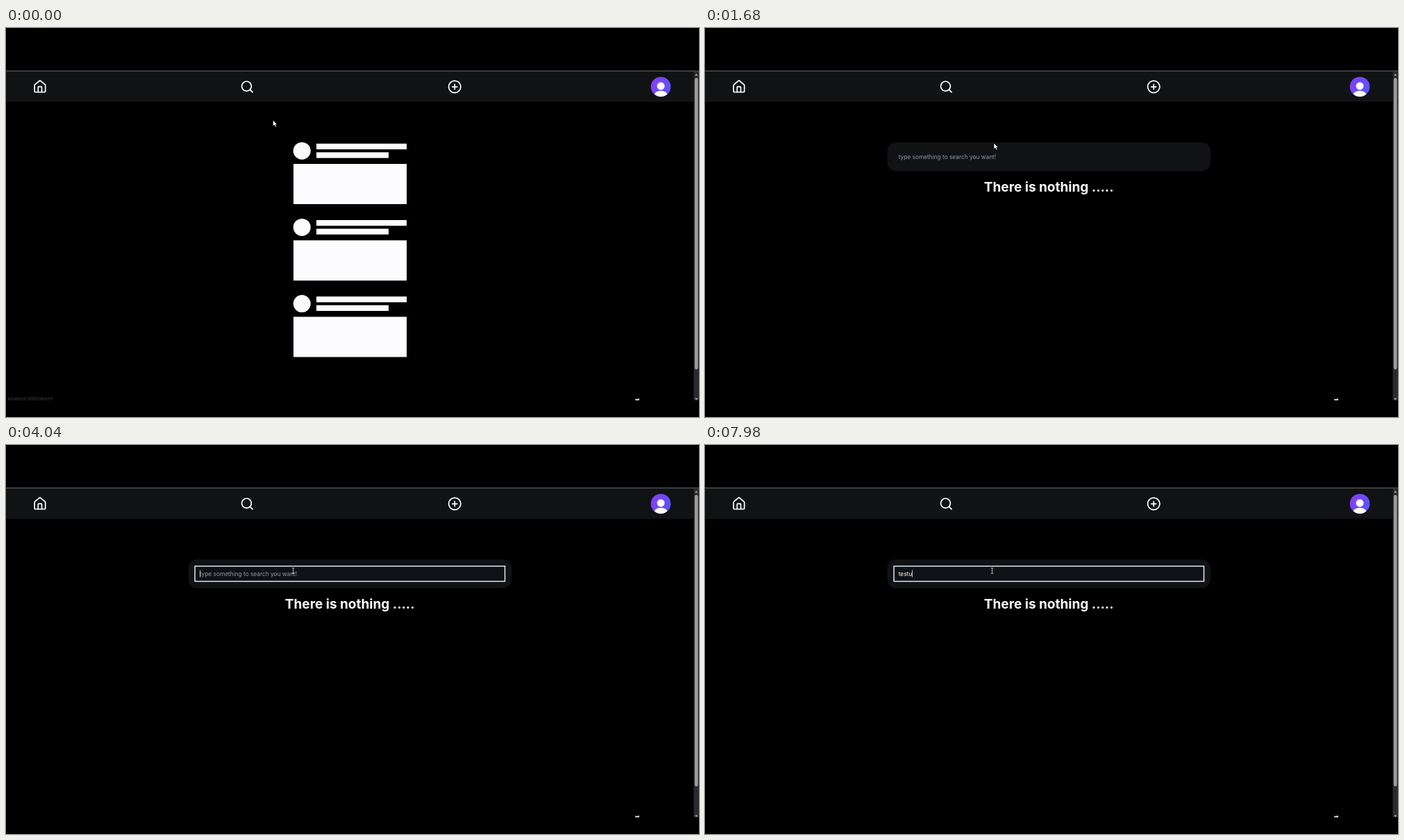
An HTML page that plays this animation: 998 by 561 pixels, repeating every 8 s.

```html
<!DOCTYPE html>
<html lang="en">
<head>
<meta charset="utf-8">
<title>Search page</title>
<style>
  html, body { margin: 0; width: 100%; height: 100%; overflow: hidden; background: #000; }
  svg { display: block; width: 100vw; height: 100vh; font-family: Inter, sans-serif; }
  .icon { fill: none; stroke: #fff; stroke-width: 2; stroke-linecap: round; stroke-linejoin: round; }
</style>
</head>
<body>
<svg viewBox="0 0 998 561">
  <defs>
    <linearGradient id="violet" x1="0" y1="0.2" x2="1" y2="0.8">
      <stop offset="0" stop-color="#873df6"/>
      <stop offset="1" stop-color="#5656fa"/>
    </linearGradient>
    <clipPath id="round"><circle cx="943" cy="84.7" r="14.3"/></clipPath>
    <g id="post" fill="#fcfcfe">
      <circle cx="426.2" cy="177.2" r="12.5"/>
      <path d="M447 166.8h130v8.2H447zM447 179.3h104v8.2H447zM414 196h163v58H414z"/>
    </g>
  </defs>
  <rect width="998" height="561"/>

  <!-- Navigation bar -->
  <rect y="61" width="998" height="2" fill="#3d3d3d"/>
  <rect y="63" width="990.5" height="43.5" fill="#101214"/>
  <g class="icon">
    <g transform="translate(38.5 74.3) scale(.867)">
      <path d="M15 21v-8a1 1 0 0 0-1-1h-4a1 1 0 0 0-1 1v8"/>
      <path d="M3 10a2 2 0 0 1 .7-1.5l7-6a2 2 0 0 1 2.6 0l7 6A2 2 0 0 1 21 10v9a2 2 0 0 1-2 2H5a2 2 0 0 1-2-2z"/>
    </g>
    <g transform="translate(336.9 74.4) scale(.867)">
      <circle cx="11" cy="11" r="8"/>
      <path d="M21 21l-4.3-4.3"/>
    </g>
    <g transform="translate(635.8 74.4) scale(.867)">
      <circle cx="12" cy="12" r="10"/>
      <path d="M8 12h8M12 8v8"/>
    </g>
  </g>
  <g clip-path="url(#round)">
    <rect x="928" y="70" width="30" height="30" fill="url(#violet)"/>
    <g fill="#fff">
      <circle cx="943" cy="83.7" r="5.5"/>
      <ellipse cx="943" cy="98.4" rx="10.4" ry="8"/>
    </g>
  </g>

  <!-- Scrollbar -->
  <rect x="990.5" y="63" width="7.5" height="474" fill="#2b2b2d"/>
  <rect x="991.8" y="72" width="4.8" height="420.5" rx="2.4" fill="#9c9c9c"/>
  <path d="M992 68.7l2.2-3 2.2 3zM992 533.8l2.2 3 2.2-3z" fill="#a2a2a2"/>
  <path d="M906.3 534.2l1.6 1.2h1.4l.6-.9h2v2.6h-5.6z" fill="#eee"/>

  <g id="feed">
    <use href="#post"/>
    <use href="#post" y="110.2"/>
    <use href="#post" y="220.4"/>
    <text x="2.5" y="537.3" font-size="6.4" fill="#444" font-family="'Open Sans', sans-serif">localhost:3000/search</text>
  </g>

  <g id="search">
    <rect x="262.5" y="165" width="465.5" height="41.5" rx="12.5" fill="#101214"/>
    <rect id="ring" x="272.1" y="174.7" width="446.4" height="21.9" fill="#101114" stroke="#dce9f3" stroke-width="1.5"/>
    <text id="hint" x="278.7" y="188.5" font-size="8.32" fill="#909aa4">type something to search you want!</text>
    <text id="query" x="278.7" y="188.5" font-size="8.32" fill="#fff"></text>
    <rect id="caret" y="180.3" width=".7" height="10.2" fill="#fff"/>
    <text x="495.2" y="236.3" font-size="19" font-weight="700" fill="#fff" text-anchor="middle">There is nothing .....</text>
  </g>

  <g id="pointer">
    <path id="arrow" d="M0 0V8.5L2 6.7 3.4 9.8 4.9 9.1 3.5 6.2H6z" fill="#fff" stroke="#000" stroke-width=".5"/>
    <path id="beam" d="M-1.7-4H-.4L0-3.6.4-4H1.7M0-3.6V3.6M-1.7 4H-.4L0 3.6.4 4H1.7" fill="none" stroke="#ddd" stroke-width=".8"/>
  </g>
</svg>
<script>
const LOOP = 8000, OPEN = 20, FOCUS = 3600, BLINK = 500;
const WORD = "testu", KEYS = [5060, 5240, 5440, 5960, 7640];
const PATH = [
  [0, 384.5, 133], [760, 384.5, 133], [960, 413, 156],
  [1700, 416, 166], [2540, 417, 171], [3100, 413.5, 181.5]
];
const $ = id => document.getElementById(id);
const show = (id, on) => $(id).setAttribute("visibility", on ? "visible" : "hidden");

function pointerAt(t) {
  const i = PATH.findIndex(p => p[0] > t);
  if (i < 0) return PATH[PATH.length - 1].slice(1);
  const [t0, x0, y0] = PATH[i - 1], [t1, x1, y1] = PATH[i];
  const k = (t - t0) / (t1 - t0), s = k * k * (3 - 2 * k);
  return [x0 + (x1 - x0) * s, y0 + (y1 - y0) * s];
}

function draw(t) {
  const open = t >= OPEN, focused = t >= FOCUS;
  show("feed", !open);
  $("search").style.display = open ? "" : "none";

  const typed = KEYS.filter(k => k <= t).length;
  $("query").textContent = WORD.slice(0, typed);
  show("hint", !typed);
  show("ring", focused);

  // The caret restarts its blink after each key
  const since = t - (typed ? KEYS[typed - 1] : FOCUS);
  show("caret", focused && since % (2 * BLINK) < BLINK);
  const end = typed ? $("query").getComputedTextLength() : 0.4;
  $("caret").setAttribute("x", 278.7 + end);

  const [x, y] = pointerAt(t), inField = y > 174.5;
  $("pointer").setAttribute("transform", `translate(${x} ${y})`);
  show("arrow", !inField);
  show("beam", inField);
}

const start = performance.now();
function tick() {
  draw((performance.now() - start) % LOOP);
  requestAnimationFrame(tick);
}
tick();
</script>
</body>
</html>
```
